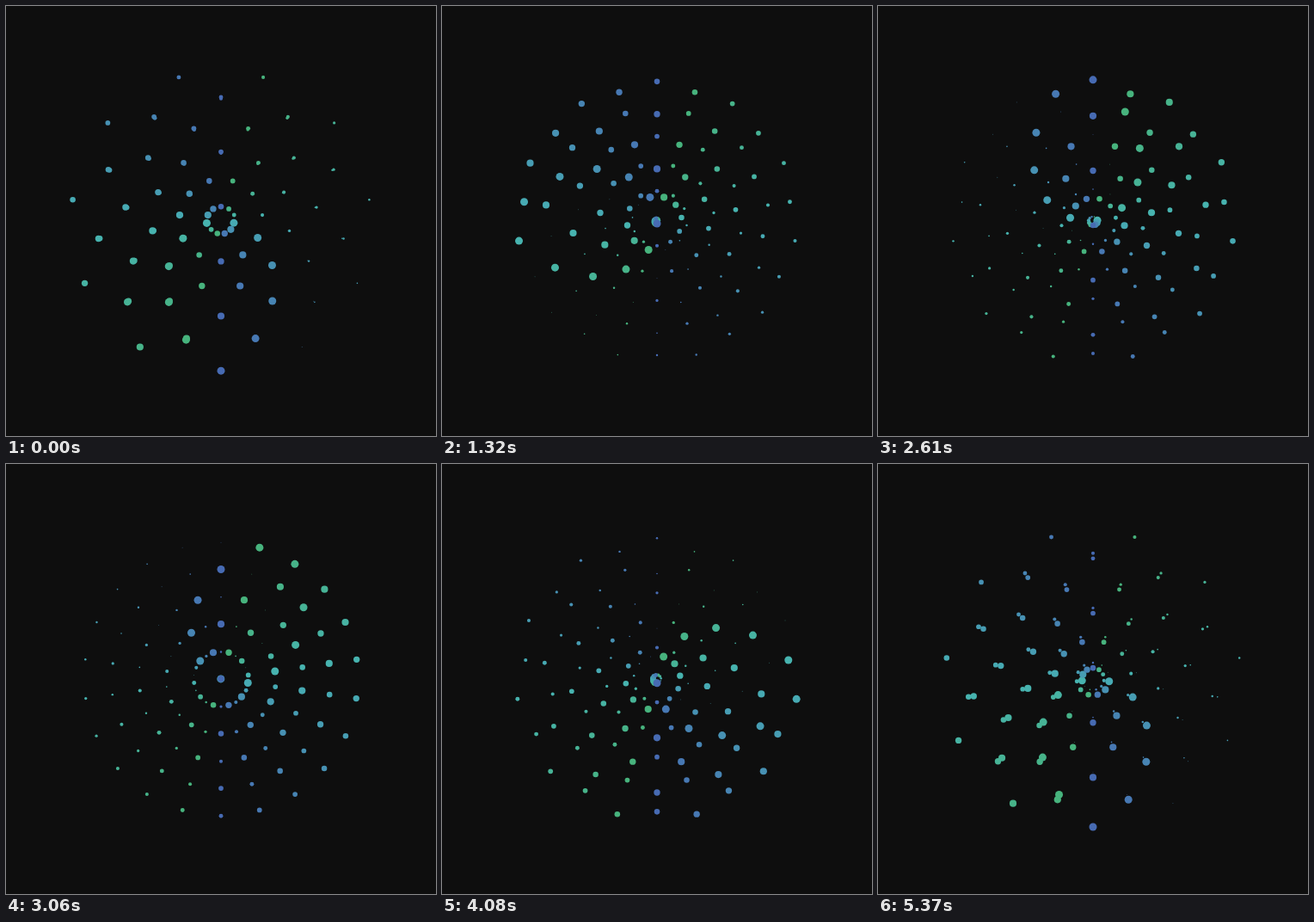
An HTML page with a canvas that plays this animation: 500 px wide and 500 px high, repeating every 5.4 s.

```html
<!DOCTYPE html>
<html lang="en">
<head>
<meta charset="utf-8">
<title>Crossing dots</title>
<style>
  html, body { margin: 0; width: 100%; height: 100%; overflow: hidden; background: #0e0e0e; }
  canvas { display: block; width: 500px; height: 500px; }
</style>
</head>
<body>
<canvas id="stage" width="500" height="500"></canvas>
<script>
const ctx = document.getElementById('stage').getContext('2d');
const LOOP = 5400, STEP = 30, LEAD = 6.5;
const COUNT = 11, REACH = 175, MAX_DOT = 4.5, CENTER = 250;

// Triangle wave: 1 at phase 0, -1 at phase 0.5
function swing(phase) {
  return 4 * Math.abs(phase % 1 - 0.5) - 1;
}

// Each line is a diameter; hue runs from green to blue around the half turn
const lines = Array.from({ length: COUNT }, (_, k) => {
  const angle = Math.PI + k * 2 * Math.PI / COUNT;
  const slot = (2 * k) % COUNT || COUNT;
  return {
    k, slot,
    dx: Math.sin(angle),
    dy: -Math.cos(angle),
    color: `hsl(${143 + 7 * slot}, 43%, 49%)`
  };
}).sort((a, b) => a.slot - b.slot);

function draw(time) {
  ctx.fillStyle = '#0e0e0e';
  ctx.fillRect(0, 0, 500, 500);
  for (const line of lines) {
    ctx.fillStyle = line.color;
    for (let j = 0; j < COUNT; j++) {
      const pos = REACH * swing((time + LEAD) / LOOP + j / COUNT);
      const size = MAX_DOT * (1 - ((j + line.k) % COUNT) / COUNT);
      ctx.beginPath();
      ctx.arc(CENTER + line.dx * pos, CENTER + line.dy * pos, size, 0, 2 * Math.PI);
      ctx.fill();
    }
  }
}

let start = null;
function tick(now) {
  if (start === null) start = now;
  const time = (now - start + 1) % LOOP;
  draw(Math.floor(time / STEP) * STEP);
  requestAnimationFrame(tick);
}
draw(0);
requestAnimationFrame(tick);
</script>
</body>
</html>
```
